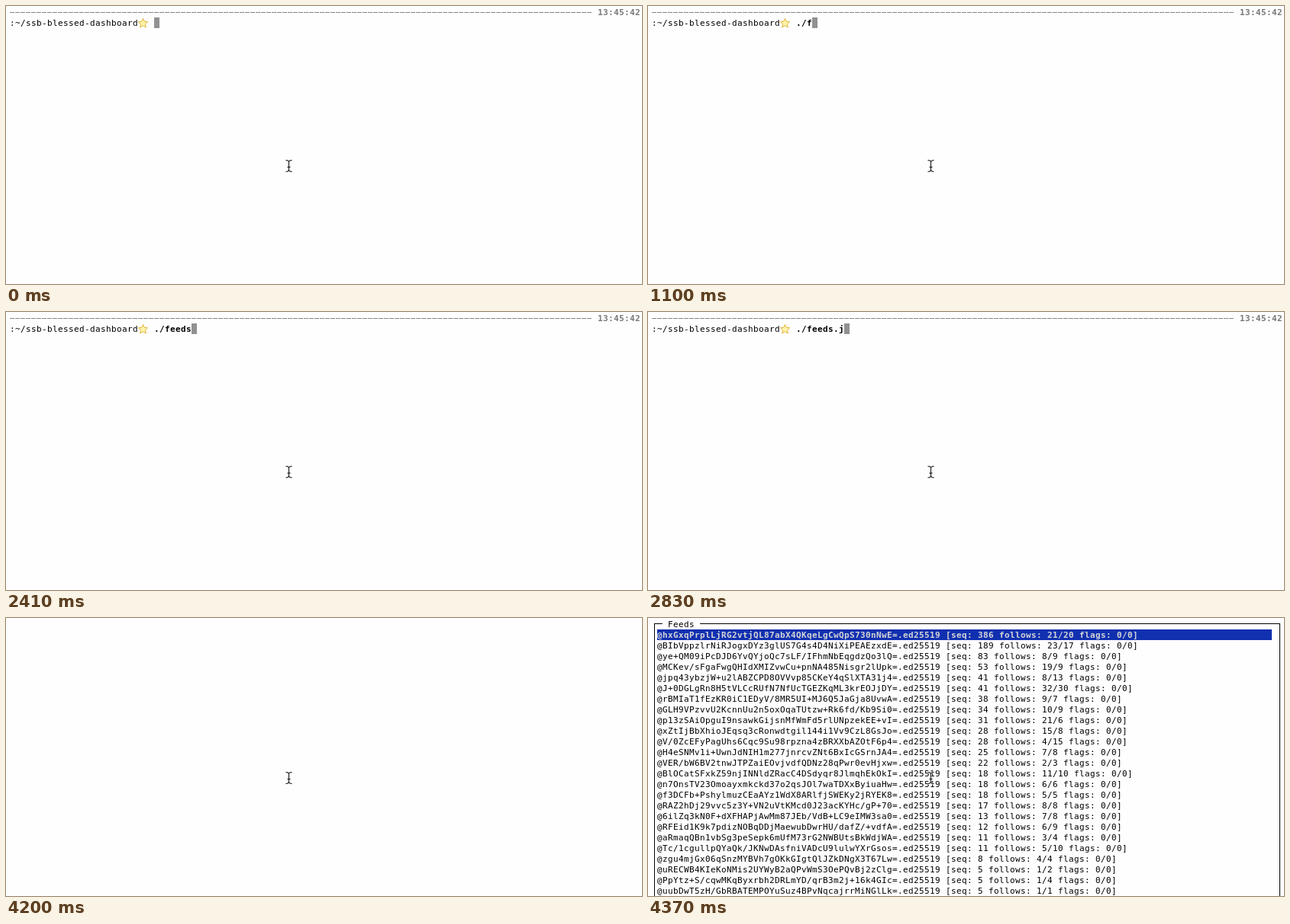
Recreate the animation shown at these times as an HTML page. Size 833x365 px, loop 8 s.

```html
<!DOCTYPE html>
<html lang="en">
<head>
<meta charset="utf-8">
<title>Terminal feeds</title>
<style>
html, body { margin: 0; width: 100%; height: 100%; overflow: hidden; background: #fefefe; }
svg { display: block; width: 833px; height: 365px; }
text { font: 11px "DejaVu Sans Mono", monospace; white-space: pre; fill: #000; }
.bold { font-weight: bold; }
.dim { fill: #777; }
.picked { fill: #d6d6d6; }
</style>
</head>
<body>
<svg id="stage" viewBox="0 0 833 365">
  <rect width="833" height="365" fill="#fefefe"/>
  <g id="shell">
    <path d="M5 8.5H768" stroke="#858585" stroke-dasharray="6 1"/>
    <path d="M179.5 16.3l1.8 4.1 4.4 .4-3.3 3 1 4.3-3.9-2.3-3.9 2.3 1-4.3-3.3-3 4.4-.4z"
      fill="#fdf3a6" stroke="#e3b545" stroke-linejoin="round"/>
    <rect id="caret" width="7" height="14" fill="#919191"/>
  </g>
  <g id="frame" fill="none" stroke="#000" shape-rendering="crispEdges">
    <path d="M19 7.5H8.5V365M68 7.5H827.5V365"/>
  </g>
  <g id="list">
    <rect x="12" y="15" width="805" height="14" fill="#1130b0"/>
  </g>
  <g fill="none">
    <path id="halo" stroke="#fff" stroke-width="3" opacity=".7"/>
    <path id="beam" stroke="#111" stroke-width="1.1"/>
  </g>
</svg>
<script>
const CELL = 7, LINE = 14, LOOP = 8000;
const $ = id => document.getElementById(id);
const colX = c => 5 + c * CELL;
const rowY = r => 1 + r * LINE;

// Text snapped to the terminal's 7 x 14 cells
const gaps = {};
function put(parent, col, row, str, cls = "") {
  const el = document.createElementNS("http://www.w3.org/2000/svg", "text");
  el.setAttribute("class", cls);
  el.setAttribute("x", colX(col));
  el.setAttribute("y", rowY(row) + 11);
  parent.append(el);
  const weight = /bold/.test(cls) ? "bold" : "plain";
  if (!(weight in gaps)) {
    el.textContent = "m".repeat(100);
    gaps[weight] = CELL - el.getComputedTextLength() / 100;
  }
  el.style.letterSpacing = gaps[weight] + "px";
  el.textContent = str;
  return el;
}

const feeds = `
hxGxqPrplLjRG2vtjQL87abX4QKqeLgCwQpS730nNwE= 386 21/20
BIbVppzlrNiRJogxDYz3glUS7G4s4D4NiXiPEAEzxdE= 189 23/17
ye+QM09iPcDJD6YvQYjoQc7sLF/IFhmNbEqgdzQo3lQ= 83 8/9
MCKev/sFgaFwgQHIdXMIZvwCu+pnNA485Nisgr2lUpk= 53 19/9
jpq43ybzjW+u2lABZCPD8OVVvp85CKeY4qSlXTA31j4= 41 8/13
J+0DGLgRn8H5tVLCcRUfN7NfUcTGEZKqML3krEOJjDY= 41 32/30
rBMIaT1fEzKR0iC1EDyV/8MR5UI+MJ6Q5JaGja8UvwA= 38 9/7
GLH9VPzvvU2KcnnUu2n5oxOqaTUtzw+Rk6fd/Kb9Si0= 34 10/9
p13zSAiOpguI9nsawkGijsnMfWmFd5rlUNpzekEE+vI= 31 21/6
xZtIjBbXhioJEqsq3cRonwdtgil144i1Vv9CzL8GsJo= 28 15/8
V/0ZcEFyPagUhs6Cqc9Su98rpzna4zBRXXbAZOtF6p4= 28 4/15
H4eSNMv1i+UwnJdNIH1m277jnrcvZNt6BxIcGSrnJA4= 25 7/8
VER/bW6BV2tnwJTPZaiEOvjvdfQDNz28qPwr0evHjxw= 22 2/3
BlOCatSFxkZ59njINNldZRacC4DSdyqr8JlmqhEkOkI= 18 11/10
n7OnsTV23Omoayxmkckd37o2qsJOl7waTDXxByiuaHw= 18 6/6
f3DCFb+PshylmuzCEaAYz1WdX8ARlfjSWEKy2jRYEK8= 18 5/5
RAZ2hDj29vvc5z3Y+VN2uVtKMcd0J23acKYHc/gP+70= 17 8/8
6ilZq3kN0F+dXFHAPjAwMm87JEb/VdB+LC9eIMW3sa0= 13 7/8
RFEid1K9k7pdizNOBqDDjMaewubDwrHU/dafZ/+vdfA= 12 6/9
aRmaqQBn1vbSg3peSepk6mUfM73rG2NWBUtsBkWdjWA= 11 3/4
Tc/1cgullpQYaQk/JKNwDAsfniVADcU9lulwYXrGsos= 11 5/10
zgu4mjGx06qSnzMYBVh7gOKkGIgtQlJZkDNgX3T67Lw= 8 4/4
uRECWB4KIeKoNMis2UYWyB2aQPvWmS3OePQvBj2zClg= 5 1/2
PpYtz+S/cqwMKqByxrbh2DRLmYD/qrB3m2j+16k4GIc= 5 1/4
uubDwT5zH/GbRBATEMPOYuSuz4BPvNqcajrrMiNGlLk= 5 1/1`;

put($("shell"), 110, 0, "13:45:42", "bold dim");
put($("shell"), 0, 1, ":~/ssb-blessed-dashboard");
const command = put($("shell"), 27, 1, "", "bold");

const title = put($("frame"), 3, 0, "Feeds");
title.setAttribute("stroke", "none");

feeds.trim().split("\n").forEach((line, i) => {
  const [key, seq, follows] = line.split(" ");
  const cls = i ? "" : "bold picked";
  put($("list"), 1, i + 1, "@" + key, cls);
  put($("list"), 46, i + 1, `.ed25519 [seq: ${seq} follows: ${follows} flags: 0/0]`, cls);
});

for (const id of ["halo", "beam"])
  $(id).setAttribute("d", "M366.5 202.5Q370.5 202.5 370.5 205V215Q370.5 217.5 366.5 217.5" +
    "M374.5 202.5Q370.5 202.5 370.5 205M370.5 215Q370.5 217.5 374.5 217.5M368.5 211.5H372.5");

// Start time and number of typed characters
const typed = [[0, 0], [710, 1], [800, 2], [1100, 3], [1220, 4], [1640, 6],
  [2410, 7], [2530, 8], [2830, 9], [2950, 10]];
const ENTER = 3240, CLEAR = 4200, BOX = 4250, FILL = 4370;

const show = (id, on) => { $(id).style.display = on ? "" : "none"; };

function draw(t) {
  const count = typed.filter(step => step[0] <= t).pop()[1];
  const text = "./feeds.js".slice(0, count);
  if (command.textContent !== text) command.textContent = text;
  const entered = t >= ENTER;
  $("caret").setAttribute("x", colX(entered ? 0 : 27 + count));
  $("caret").setAttribute("y", rowY(entered ? 2 : 1));
  show("shell", t < CLEAR);
  show("frame", t >= BOX);
  show("list", t >= FILL);
}

const start = performance.now();
function tick() {
  draw((performance.now() - start) % LOOP);
  requestAnimationFrame(tick);
}
tick();
</script>
</body>
</html>
```
